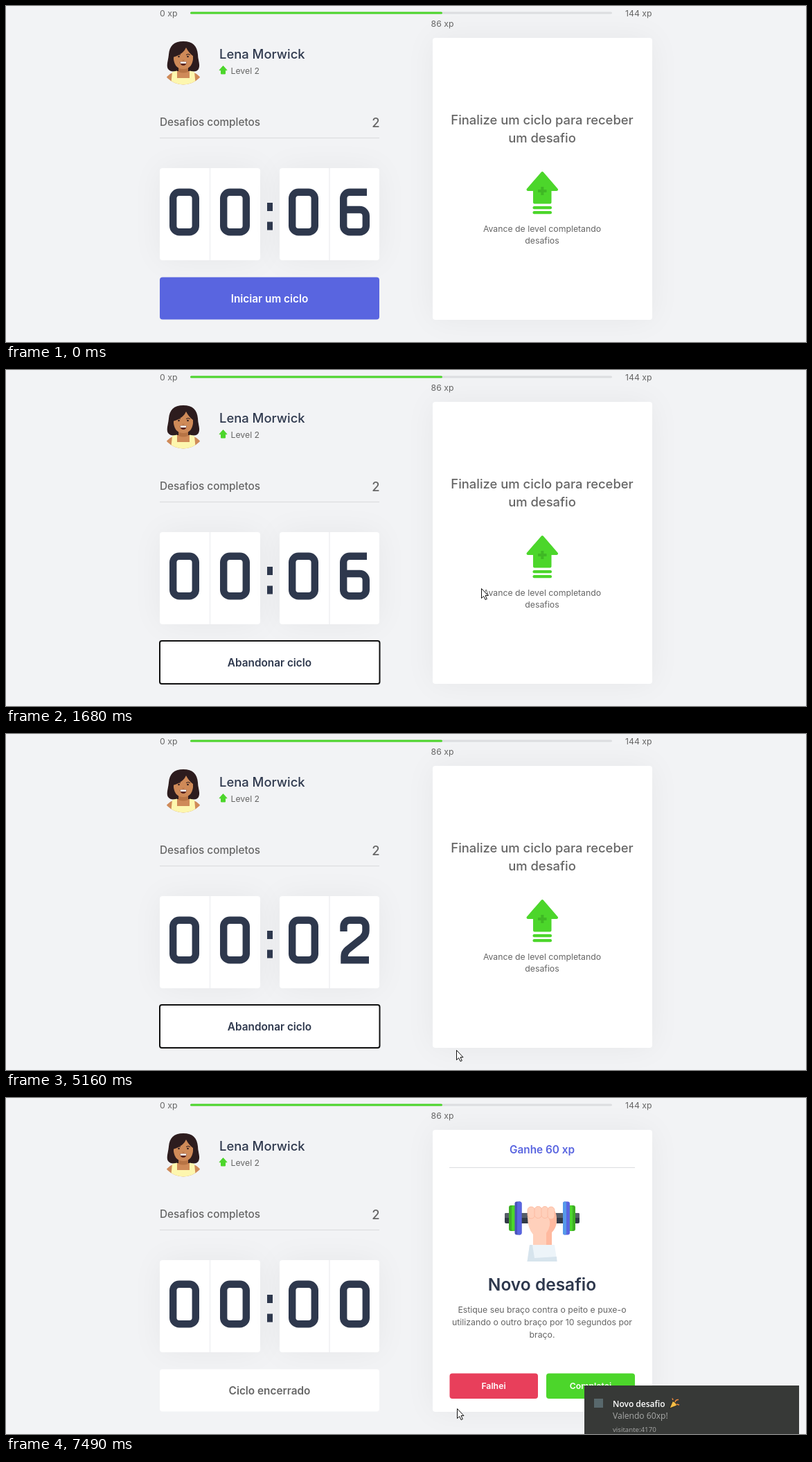
Write an HTML page that moves like this. It is 1155 px wide and 485 px high and loops after 8 s.

```html
<!DOCTYPE html>
<html lang="pt-BR">
<head>
<meta charset="utf-8">
<title>Ciclo</title>
<style>
html, body { margin: 0; width: 100%; height: 100%; overflow: hidden; background: #f2f3f5; }
.card { position: absolute; background: #fff; border-radius: 4px; box-shadow: 0 0 46px rgba(0, 0, 0, .05); }
svg { position: absolute; left: 0; top: 0; }
text { font: 400 12.27px Inter, sans-serif; fill: #666; }
.mid { text-anchor: middle; }
.end { text-anchor: end; }
.lg { font-size: 15.34px; font-weight: 500; }
.xl { font-size: 18.4px; font-weight: 500; }
.bold { font-weight: 600; }
.toast { font-family: "Open Sans", "Noto Sans", sans-serif; }
.digits path { fill: none; stroke: #2e384d; stroke-width: 10.4; }
</style>
</head>
<body>
<div class="card" style="left:222px;top:234px;width:145px;height:133px"></div>
<div class="card" style="left:395px;top:234px;width:144px;height:133px"></div>
<div class="card" style="left:616px;top:46px;width:317px;height:407px"></div>

<svg width="1155" height="485" viewBox="0 0 1155 485">
  <defs><clipPath id="round"><circle cx="256" cy="81" r="32.5"/></clipPath></defs>

  <!-- experience bar -->
  <text x="222" y="14.5">0 xp</text>
  <text class="end" x="932.5" y="14.5">144 xp</text>
  <rect x="266" y="8.5" width="609" height="3" rx="1.5" fill="#dcdde0"/>
  <rect x="266" y="8.5" width="364" height="3" rx="1.5" fill="#4cd62b"/>
  <text class="mid" x="630" y="30">86 xp</text>

  <!-- profile -->
  <g clip-path="url(#round)">
    <path fill="#2d1c1e" d="M256 51C242 51 236 58 235 70C234 80 231 86 234 91Q238 96 246 94H266Q275 96 278 91C281 85 277 78 277 70C276 58 270 51 256 51Z"/>
    <path fill="#cf8a58" d="M230 106Q235 96 248 94H264Q277 96 282 106V115H230Z"/>
    <path fill="#fdf6ae" d="M240 95L247 93.500V104H265V93.500L272 95L274 115H238Z"/>
    <path fill="#b87445" d="M249 84H263V95Q256 98 249 95Z"/>
    <path fill="#cf8a58" d="M242 68Q242 59 256 59T270 68V77Q268 91 256 91T242 77Z"/>
    <path fill="#2d1c1e" d="M241 74Q256 70 260 60Q264 68 271 73V60Q256 49 241 60Z"/>
    <path fill="none" stroke="#2d1c1e" d="M246 70.500Q249 68.500 252 70.500M260 70.500Q263 68.500 266 70.500"/>
    <circle cx="249.500" cy="73" r="1.300" fill="#2d1c1e"/>
    <circle cx="262.500" cy="73" r="1.300" fill="#2d1c1e"/>
    <path fill="none" stroke="#b06c40" d="M254.500 78Q256 79.500 257.500 78"/>
    <path fill="#5a2520" d="M251 80.500H261Q260 86 256 86T251 80.500Z"/>
    <path fill="#fff" d="M251.500 80.500H260.500L260 83H252Z"/>
  </g>
  <text class="xl" x="308" y="75.5" style="fill:#2e384d">Lena Morwick</text>
  <path fill="#4cd62b" stroke="#4cd62b" stroke-linejoin="round" d="M313.500 86.500L319 92.700H316.500V98H310.500V92.700H308Z"/>
  <text x="324.5" y="98">Level 2</text>
  <text class="lg" x="222" y="172.800">Desafios completos</text>
  <text class="xl end" x="539.5" y="174.5">2</text>
  <path stroke="#d9dadd" d="M222 190.500H539"/>

  <!-- countdown -->
  <path stroke="#eff0f2" stroke-width="1.500" d="M294.500 234V367M467 234V367"/>
  <g class="digits">
    <path transform="translate(236 264)"/>
    <path transform="translate(309 264)"/>
    <path transform="translate(408 264)"/>
    <path transform="translate(482 264)" id="units"/>
  </g>
  <path fill="#2e384d" d="M377 284h8v12h-8zM377 311.500h8v12h-8z"/>
  <rect id="button" x="222" y="391.500" width="317" height="61" rx="4"/>
  <rect id="ring" x="222" y="391" width="317.500" height="62" rx="3" fill="none" stroke="#101010" stroke-width="2"/>
  <text id="label" class="lg bold mid" x="380.500" y="428"></text>

  <!-- waiting for a challenge -->
  <g id="idle">
    <text class="xl mid" x="774" y="170.500">Finalize um ciclo para receber</text>
    <text class="xl mid" x="774" y="196.500">um desafio</text>
    <g fill="#4cd62b">
      <path stroke="#4cd62b" stroke-width="4" stroke-linejoin="round" d="M774.300 241L795 265H785.500V283.500H763V265H753.500Z"/>
      <rect x="760.500" y="289" width="27.500" height="4.200" rx="2"/>
      <rect x="760.500" y="296" width="27.500" height="4.200" rx="2"/>
    </g>
    <path stroke="#3fb824" stroke-width="4" d="M768 267H780.500M774.300 261V273"/>
    <text class="mid" x="774" y="326">Avance de level completando</text>
    <text class="mid" x="774" y="343">desafios</text>
  </g>

  <!-- active challenge -->
  <g id="challenge">
    <text class="lg bold mid" x="774" y="79.500" style="fill:#5965e0">Ganhe 60 xp</text>
    <path stroke="#dcdde0" d="M640 100.500H908"/>
    <rect x="720" y="166" width="108" height="15" rx="2" fill="#323a47"/>
    <path fill="#565d68" d="M722 166H826Q828 166 828 168V173H720V168Q720 166 722 166Z"/>
    <rect x="726" y="155" width="10" height="37" rx="3" fill="#3fae25"/>
    <rect x="730" y="155" width="6" height="37" rx="3" fill="#4cd62b"/>
    <rect x="734.500" y="149.500" width="10" height="48" rx="3" fill="#4953b8"/>
    <rect x="738" y="149.500" width="6.500" height="48" rx="3" fill="#5965e0"/>
    <rect x="812" y="155" width="10" height="37" rx="3" fill="#3fae25"/>
    <rect x="812" y="155" width="6" height="37" rx="3" fill="#4cd62b"/>
    <rect x="804" y="149.500" width="10" height="48" rx="3" fill="#5965e0"/>
    <rect x="804" y="149.500" width="5" height="48" rx="3" fill="#5599ea"/>
    <path fill="#ffd0bb" d="M753 172Q755 165 764 165H786Q796 168 795 180Q794 188 788 194V214H761V197Q753 188 753 172Z"/>
    <path fill="#ffb99f" d="M784 158Q796 160 795 178Q794 188 788 194V214H780V195Q788 184 784 174Z"/>
    <g fill="#ffd0bb" stroke="#fcb69c" stroke-width=".8">
      <rect x="753" y="157" width="10.500" height="17" rx="5"/>
      <rect x="763" y="156.500" width="10.500" height="17" rx="5"/>
      <rect x="773" y="156.500" width="10" height="17" rx="5"/>
      <rect x="782" y="157" width="10" height="18" rx="5"/>
    </g>
    <path fill="#edf4f9" d="M756 212H792L795.500 236H752.500Z"/>
    <path fill="#d7e4ed" d="M756 212H760L763 231L795 229L795.500 236H752.500Z"/>
    <text class="bold mid" x="774" y="277.500" style="font-size:24.5px;fill:#2e384d">Novo desafio</text>
    <text class="mid" x="774" y="310">Estique seu braço contra o peito e puxe-o</text>
    <text class="mid" x="774" y="328">utilizando o outro braço por 10 segundos por</text>
    <text class="mid" x="774" y="346">braço.</text>
    <rect x="640.500" y="397.500" width="127.500" height="36.500" rx="4" fill="#e83f5b"/>
    <rect x="780" y="397.500" width="128" height="36.500" rx="4" fill="#4cd62b"/>
    <text class="bold mid" x="704" y="420.300" style="fill:#fff">Falhei</text>
    <text class="bold mid" x="844" y="420.300" style="fill:#fff">Completei</text>
  </g>

  <!-- notification -->
  <g id="toast">
    <rect x="835" y="415" width="310" height="70" fill="#373937"/>
    <rect x="849" y="434" width="13" height="13" fill="#58686c"/>
    <text class="toast bold" x="876" y="445.500" style="font-size:12px;fill:#fff">Novo desafio</text>
    <path fill="#f5bd45" stroke="#1c1c1c" stroke-width=".8" stroke-linejoin="round" d="M958 448L962.500 437.500Q968 439.500 968.500 444Z"/>
    <path fill="none" stroke="#f08a3c" stroke-width="1.500" d="M966 439Q967 435 971 435.500M968 442L972 443M963 436L962 433.500"/>
    <text class="toast" x="876" y="463" style="font-size:12.100px;fill:#a9aaa9">Valendo 60xp!</text>
    <text class="toast" x="876" y="481.500" style="font-size:9.700px;fill:#a9aaa9">visitante:4170</text>
  </g>

  <g id="cursor" fill="#fff" stroke="#111" stroke-linejoin="round">
    <path id="arrow" d="M.5 .5V14.500L3.700 11.500L6 16.500L8.300 15.500L6 10.600H10Z"/>
    <path id="hand" d="M-1.500 1.500Q0 -1.500 1.500 1.500V7Q3 5.500 4 7.500Q5.500 6 6.500 8.300Q9 7 9 10.500V14Q8.500 17 7 18.500V20H-1V18.500Q-4 15 -5.800 11.500Q-5 8.500 -1.500 12Z"/>
  </g>
</svg>

<script>
const LOOP = 8000, CLICK = 960, LEAVE = 1470, DONE = 7185;
const $ = id => document.getElementById(id);

const digits = [
  'M5.2 13.8a9 9 0 0 1 9-9h14.6a9 9 0 0 1 9 9v39.4a9 9 0 0 1-9 9h-14.6a9 9 0 0 1-9-9z',
  'M9 13L22 5V67',
  'M5.500 21V13.800a9 9 0 0 1 9-9H28.500a9 9 0 0 1 9 9V20Q37.500 26 33 30L11 47.500Q6.500 51.500 6.500 57V62.200H42',
  'M3 4.800H28.800a9 9 0 0 1 9 9V24a9 9 0 0 1-9 9H12M28.800 33a9 9 0 0 1 9 9V53.200a9 9 0 0 1-9 9H3',
  'M47 49.500H3V46.500L29 5H33V67',
  'M39 4.800H7V29.500H28.800a9 9 0 0 1 9 9V53.200a9 9 0 0 1-9 9H3',
  'M39 4.800H14.200a9 9 0 0 0-9 9V53.200a9 9 0 0 0 9 9H28.800a9 9 0 0 0 9-9V39a9 9 0 0 0-9-9H5.200'
];
const ticks = [2120, 3135, 4150, 5155, 6165, 7115];

// pointer path: time, x, y
const path = [
  [70, 1108, 284], [300, 880, 360], [600, 580, 442], [700, 520, 430], [840, 467, 416],
  [1370, 467, 416], [1440, 505, 397], [1680, 685, 315], [1950, 923, 380], [2210, 852, 446],
  [2290, 775, 447], [2450, 659, 449], [2680, 658, 450], [3830, 658, 450], [3896, 656, 449],
  [4230, 650, 456], [5190, 650, 456], [5390, 651, 449], [6800, 651, 449], [6950, 651, 448], [LOOP, 651, 448]
];

// button colour changes: start, duration, colour
const fades = [
  [665, 200, [73, 83, 184]],
  [CLICK, 180, [232, 63, 91]],
  [LEAVE, 190, [255, 255, 255]]
];

const clamp = k => Math.max(0, Math.min(1, k));
const mix = (a, b, k) => a + (b - a) * k;
const show = (id, on) => $(id).setAttribute('visibility', on ? 'inherit' : 'hidden');

function pointerAt(t) {
  const i = Math.max(1, path.findIndex(p => p[0] >= t));
  const [a, b] = [path[i - 1], path[i]];
  const k = clamp((t - a[0]) / (b[0] - a[0]));
  return [1, 2].map(n => Math.round(mix(a[n], b[n], k)));
}

function drawButton(t) {
  let colour = [89, 101, 224];
  for (const [start, length, to] of fades) {
    const k = clamp((t - start) / length);
    colour = colour.map((c, i) => mix(c, to[i], 1 - (1 - k) ** 2));
  }
  $('button').setAttribute('fill', `rgb(${colour.map(Math.round)})`);
  $('label').textContent = t < CLICK ? 'Iniciar um ciclo' : t < DONE ? 'Abandonar ciclo' : 'Ciclo encerrado';
  $('label').style.fill = t < LEAVE ? '#fff' : t < DONE ? '#2e384d' : '#666';
  show('ring', t >= 905 && t < DONE);
}

function drawPointer(t) {
  // the pointer is sampled about 13 times a second
  const [x, y] = pointerAt(Math.floor((t + 12) / 76.4) * 76.4);
  const over = x > 222 && x < 539 && y > 391 && y < 453;
  $('cursor').setAttribute('transform', `translate(${x} ${y})`);
  show('cursor', t >= 65);
  show('hand', over && t >= 65);
  show('arrow', !over && t >= 65);
}

function frame() {
  const t = performance.now() % LOOP;
  $('units').setAttribute('d', digits[6 - ticks.filter(at => t >= at).length]);
  drawButton(t);
  drawPointer(t);
  show('idle', t < DONE);
  show('challenge', t >= DONE);
  show('toast', t >= 7485);
  requestAnimationFrame(frame);
}

document.querySelectorAll('.digits path').forEach(p => p.setAttribute('d', digits[0]));
frame();
</script>
</body>
</html>
```
